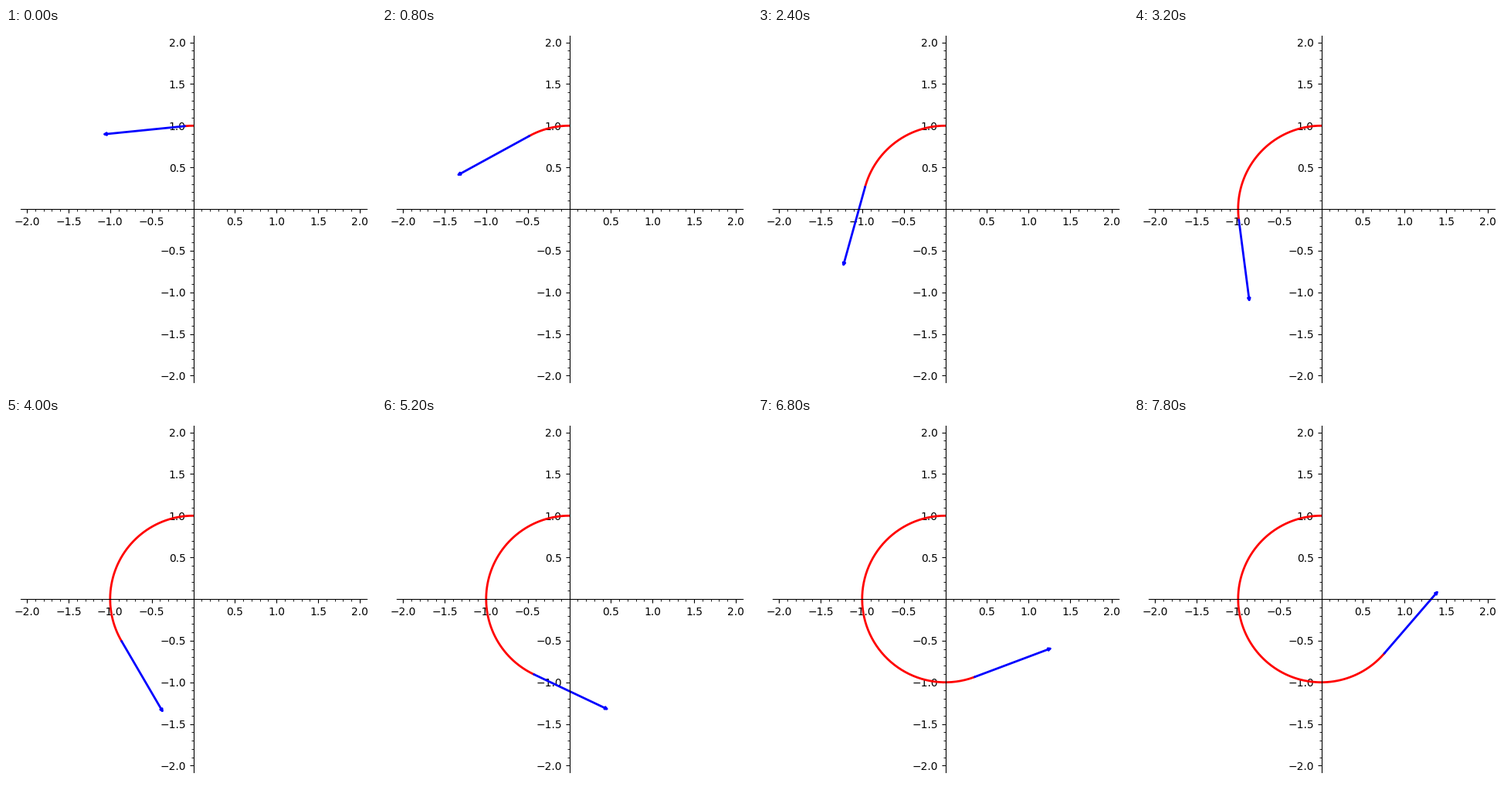
Animation, 479 px wide and 468 px high, one loop 8000 ms. Source, as a matplotlib script:

```python
import numpy as np
import matplotlib.pyplot as plt
from matplotlib.animation import FuncAnimation
from matplotlib.patches import FancyArrowPatch
from matplotlib.ticker import MultipleLocator

WIDTH, HEIGHT, DPI = 479, 468, 100
FRAMES, INTERVAL = 40, 200
STEP = 0.1    # radians per frame
LIMIT = 2.08
SIDE = 448    # plot area in pixels

plt.rcParams["font.family"] = "DejaVu Sans"
plt.rcParams["font.size"] = 10


def position(t):
    return -np.sin(t), np.cos(t)


def velocity(t):
    return -np.cos(t), -np.sin(t)


def setup_axes(fig):
    ax = fig.add_axes([18.5 / WIDTH, 10 / HEIGHT, SIDE / WIDTH, SIDE / HEIGHT])
    ax.set_facecolor("none")
    ticks = [v for v in np.arange(-2, 2.1, 0.5) if v != 0]
    for axis in (ax.xaxis, ax.yaxis):
        axis.set_ticks(ticks)
        axis.set_minor_locator(MultipleLocator(0.1))
    ax.set_xlim(-LIMIT, LIMIT)
    ax.set_ylim(-LIMIT, LIMIT)
    for side in ("left", "bottom"):
        ax.spines[side].set_position("zero")
    for side in ("right", "top"):
        ax.spines[side].set_visible(False)
    return ax


fig = plt.figure(figsize=(WIDTH / DPI, HEIGHT / DPI), dpi=DPI, facecolor="white")
ax = setup_axes(fig)
path, = ax.plot([], [], color="red", lw=2)
arrow = FancyArrowPatch((0, 1), (-1, 1), lw=2, color="blue",
                        arrowstyle="-|>,head_width=1,head_length=2",
                        mutation_scale=1, shrinkA=0, shrinkB=0, zorder=2.2)
ax.add_patch(arrow)


def update(i):
    t = STEP * (i + 1)
    path.set_data(*position(np.linspace(0, t, 200)))
    x, y = position(t)
    dx, dy = velocity(t)
    arrow.set_positions((x, y), (x + dx, y + dy))
    return path, arrow


anim = FuncAnimation(fig, update, frames=FRAMES, interval=INTERVAL,
                     init_func=lambda: update(0), repeat=True, repeat_delay=0)
plt.show()
```
